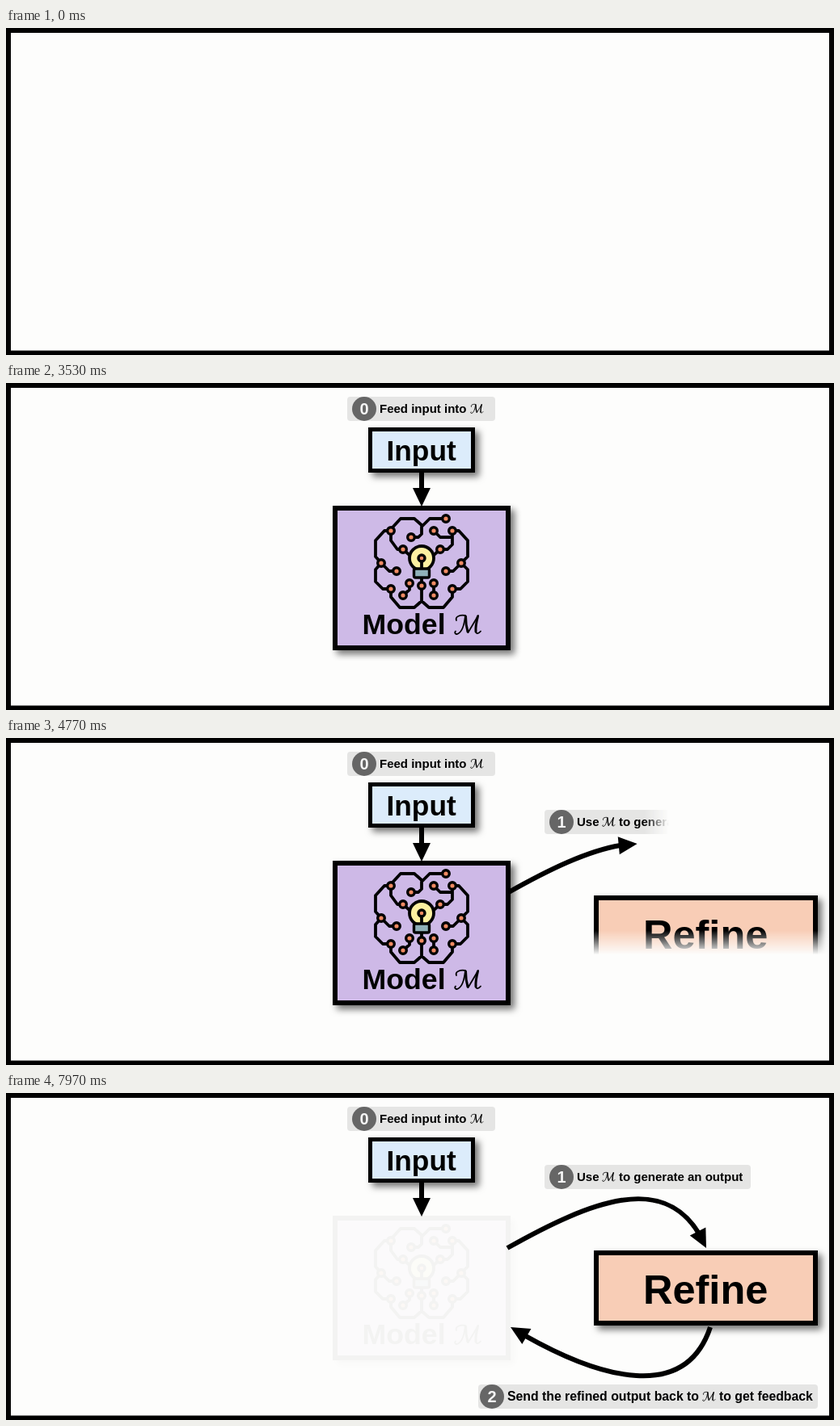
Write an HTML page that moves like this. It is 1024 px wide and 405 px high and loops after 8 s.

```html
<!DOCTYPE html>
<html lang="en">
<head>
<meta charset="utf-8">
<title>Refinement loop</title>
<style>
  html, body { margin: 0; width: 100%; height: 100%; overflow: hidden; background: #000; }
  svg { display: block; width: 100%; height: 100%; }
  text { font-family: "Liberation Sans", Arial, sans-serif; font-weight: bold; white-space: pre; }
  .box { stroke: #000; stroke-width: 6; filter: drop-shadow(5px 5px 4px rgba(0, 0, 0, .55)); }
  .pill { fill: #e5e5e4; }
  .badge { fill: #666; }
  .digit { fill: #f4f4f4; font-size: 20px; text-anchor: middle; }
  .wire { fill: none; stroke: #000; stroke-width: 3.8; stroke-linejoin: round; }
  .node { fill: #f08a62; stroke: #000; stroke-width: 3.4; }
  .shaft { fill: none; stroke: #000; stroke-width: 6; }
</style>
</head>
<body>
<svg viewBox="0 0 1024 405">
  <defs id="defs">
    <g id="scriptM" fill="none" stroke="#000" stroke-linecap="round" stroke-linejoin="round">
      <path stroke-width="1.8" d="M3 8C1 3 8 1 14 2C13 12 10 22 5 24.500C2 26 0 23 2 21.500M17.500 23L30 2M27 21C27 26 31 24 33 21.500"/>
      <path stroke-width="3" d="M14.500 3C14.500 10 15.500 17 17 22M29.500 3C28 9 26.500 16 27 22"/>
    </g>
  </defs>
  <rect x="6" y="6" width="1012" height="393.500" fill="#fdfdfc"/>

  <g id="arrow1"></g>
  <g id="model">
    <rect class="box" x="407" y="155" width="214" height="173" fill="#ceb9e7"/>
    <path class="wire" d="M514 176L505 168H488L476 181V195L484 206H491L500 214
      M476 183H468L457 195V215L464 223L457 231V246L466 255H476V265L487 278H505L514 270
      M501 191H510L514 187V178L524 168H544M529 183L537 191H552
      M552 183V200L546 206H537L528 214
      M552 183H560L571 195V215L563 223L571 231V246L562 255H552V265L541 278H523L514 270V242
      M464 223L474 233H483M563 223L553 233H544M499 248V256L491 263M529 248V263"/>
    <g id="nodes"></g>
    <circle cx="514" cy="217" r="15" fill="#fcf0a0" stroke="#000" stroke-width="3.8"/>
    <path class="wire" d="M514 217V231"/>
    <rect x="504.500" y="230" width="19" height="11" rx="2" fill="#8fb0b8" stroke="#000" stroke-width="3.400"/>
    <circle class="node" cx="514" cy="217" r="4"/>
    <text x="440.500" y="311" font-size="35.700">Model</text>
    <use href="#scriptM" x="554" y="286"/>
  </g>
  <g id="input">
    <rect class="box" x="450.500" y="57.500" width="127" height="51" fill="#dcecfb" style="stroke-width: 5"/>
    <text x="470.500" y="96" font-size="35.300">Input</text>
  </g>
  <g id="refine">
    <rect class="box" x="730" y="198" width="271" height="87" fill="#f8cdb6"/>
    <text x="788" y="261" font-size="50.500">Refine</text>
  </g>
  <g id="arrow0"></g>
  <g id="arrow2"></g>
  <g id="label0"></g>
  <g id="label1"></g>
  <g id="label2"></g>
</svg>
<script>
const LOOP = 8000, SOFT = 30, HEAD = 23;
const byId = id => document.getElementById(id);
const clamp = v => Math.max(0, Math.min(1, v));
const ease = p => p * p * (3 - 2 * p);
const progress = (t, start, end) => ease(clamp((t - start) / (end - start)));

byId('nodes').innerHTML = [
  [544, 168], [476, 183], [501, 191], [529, 183], [552, 183], [491, 206],
  [537, 206], [464, 223], [563, 223], [483, 233], [544, 233], [476, 255],
  [552, 255], [499, 248], [529, 248], [491, 263], [529, 263], [514, 251]
].map(([x, y]) => `<circle class="node" cx="${x}" cy="${y}" r="4.3"/>`).join('');

function addLabel(n, x, width, y, badgeX, size, before, mX, after = '') {
  byId('label' + n).innerHTML = `
    <rect class="pill" x="${x}" y="${y}" width="${width}" height="30" rx="4"/>
    <circle class="badge" cx="${badgeX}" cy="${y + 15}" r="15"/>
    <text class="digit" x="${badgeX}" y="${y + 22}">${n}</text>
    <text x="${badgeX + 19}" y="${y + 20}" font-size="${size}">${before}</text>
    <use href="#scriptM" transform="translate(${mX} ${y + 8.5}) scale(.48)"/>
    <text x="${mX + 21}" y="${y + 20}" font-size="${size}">${after}</text>`;
}
addLabel(0, 422, 183, 17, 443, 15, 'Feed input into', 574);
addLabel(1, 666, 255, 89, 687, 15, 'Use', 737, 'to generate an output');
addLabel(2, 584, 420, 361, 601, 15.8, 'Send the refined output back to', 861, 'to get feedback');

// Soft-edged reveal between two coordinates along one axis.
function makeWipe(id, axis, from, to, start, end) {
  const far = axis === 'x' ? `x2="${SOFT}" y2="0"` : `x2="0" y2="${SOFT}"`;
  byId('defs').insertAdjacentHTML('beforeend', `
    <linearGradient id="edge-${id}" gradientUnits="userSpaceOnUse" x1="0" y1="0" ${far}>
      <stop offset="0" stop-color="#fff"/><stop offset="1" stop-color="#000"/>
    </linearGradient>
    <mask id="mask-${id}" maskUnits="userSpaceOnUse" x="0" y="0" width="1024" height="405">
      <rect width="1024" height="405" fill="url(#edge-${id})"/>
    </mask>`);
  const target = byId(id), edge = byId('edge-' + id);
  target.setAttribute('mask', `url(#mask-${id})`);
  return t => {
    const pos = from - SOFT + (to - from + SOFT) * progress(t, start, end);
    edge.setAttribute('gradientTransform', axis === 'x' ? `translate(${pos} 0)` : `translate(0 ${pos})`);
    target.style.visibility = t > start ? 'visible' : 'hidden';
  };
}

// Arrow whose head travels along the path.
function makeArrow(id, d, start, end) {
  const group = byId(id);
  group.innerHTML = `<path class="shaft" d="${d}"/><path d="M0 0L${-HEAD} -11V11Z"/>`;
  const [shaft, head] = group.children;
  const total = shaft.getTotalLength();
  return t => {
    const reach = HEAD + (total - HEAD) * progress(t, start, end);
    const neck = reach - HEAD + 2;
    const tip = shaft.getPointAtLength(reach), base = shaft.getPointAtLength(neck);
    const angle = Math.atan2(tip.y - base.y, tip.x - base.x) * 180 / Math.PI;
    shaft.setAttribute('stroke-dasharray', `${neck} ${total + 10}`);
    head.setAttribute('transform', `translate(${tip.x} ${tip.y}) rotate(${angle})`);
    group.style.visibility = t > start ? 'visible' : 'hidden';
  };
}

function makeBlink(id, starts, duration) {
  const target = byId(id);
  return t => {
    const start = starts.find(s => t >= s && t < s + duration);
    target.style.opacity = start === undefined ? 1 : Math.cos(Math.PI * (t - start) / duration) ** 2;
  };
}

const parts = [
  makeWipe('model', 'y', 145, 346, 40, 1060),
  makeWipe('input', 'y', 48, 126, 940, 1830),
  makeWipe('label0', 'x', 422, 605, 2040, 3130),
  makeArrow('arrow0', 'M514 109V153', 2040, 3130),
  makeBlink('model', [3500, 7640], 750),
  makeWipe('refine', 'y', 189, 306, 4250, 5240),
  makeWipe('label1', 'x', 666, 921, 4250, 5240),
  makeArrow('arrow1', 'M620 192C735 127 825 96 866 192', 4250, 5200),
  makeWipe('label2', 'x', 584, 1004, 6040, 7360),
  makeArrow('arrow2', 'M871 290C838 390 720 348 624 290', 6040, 7240)
];

const origin = performance.now();
function draw(now) {
  const t = Math.max(0, now - origin) % LOOP;
  parts.forEach(update => update(t));
  requestAnimationFrame(draw);
}
draw(origin);
</script>
</body>
</html>
```
